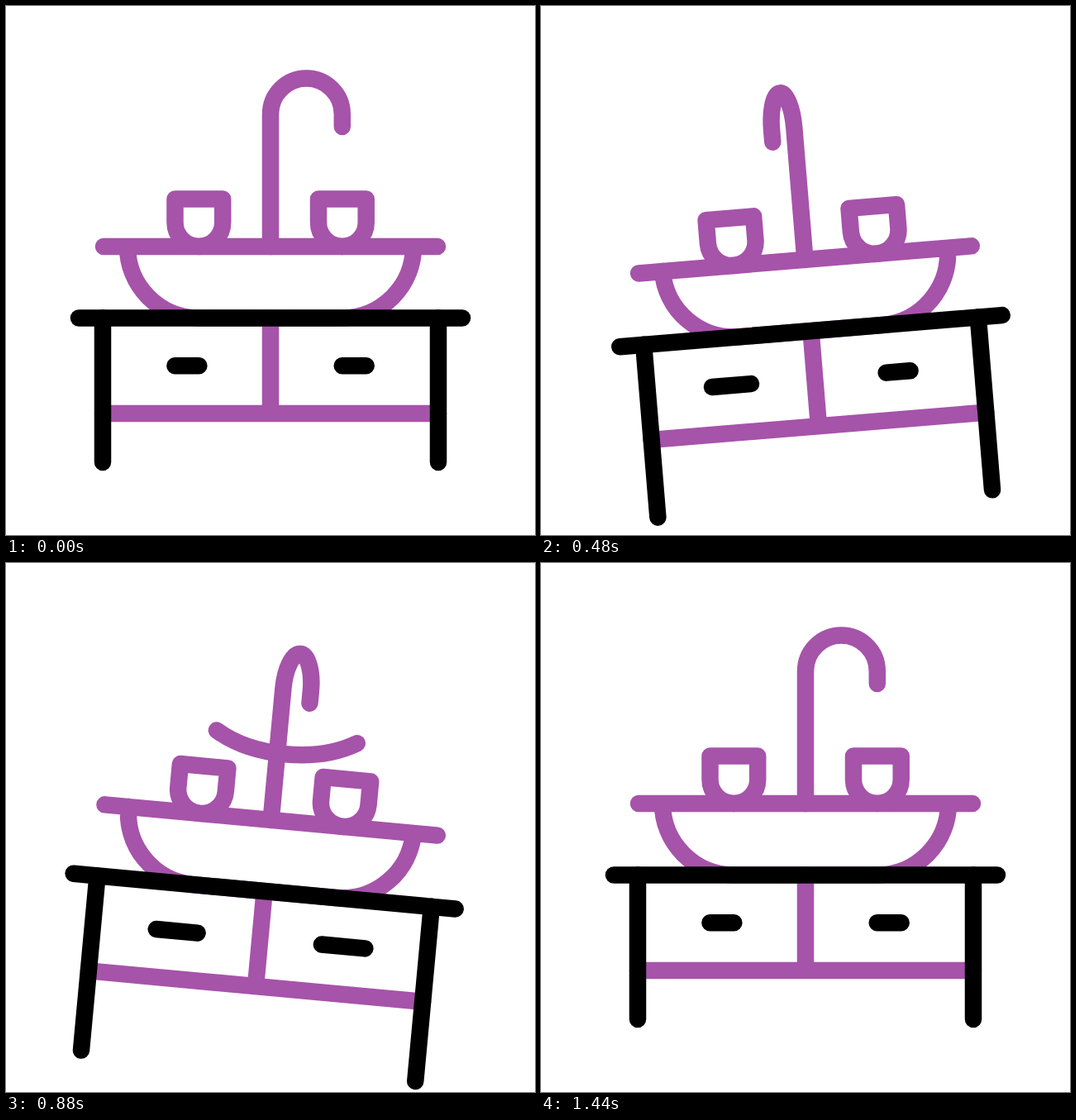
Recreate the animation shown at these times as an HTML page. Size 640 by 640 pixels, loop 1520 ms.

```html
<!DOCTYPE html>
<html lang="en">
<head>
<meta charset="utf-8">
<title>Washbasin</title>
<style>
  html, body { margin: 0; width: 100%; height: 100%; overflow: hidden; background: #fff; }
  svg { display: block; width: 100vw; height: 100vh; }
  path { fill: none; stroke-width: 20.5; stroke-linecap: round; stroke-linejoin: round; }
  .plum { stroke: #a653aa; }
  .ink { stroke: #000; }
</style>
</head>
<body>
<svg viewBox="0 0 640 640">
  <g id="unit">
    <g class="plum">
      <path d="M117 493H523M320 377.5V493"/>
      <path d="M118 291H522M147 291a86.5 86.5 0 0 0 86.5 86.5H406.5a86.5 86.5 0 0 0 86.5 -86.5"/>
      <path d="M204.5 233.5h57.7v28.6a28.85 28.85 0 0 1 -57.7 0z"/>
      <path d="M378 233.5h57.7v28.6a28.85 28.85 0 0 1 -57.7 0z"/>
      <path id="tap"/>
      <path id="arc" pathLength="1" d="M217 164.5C260.6 225.2 399 225.2 442.6 164.5"/>
    </g>
    <g class="ink">
      <path d="M88 377.5H552"/>
      <path id="legs"/>
      <path id="pulls"/>
    </g>
  </g>
</svg>
<script>
const LOOP = 1520, STEP = 40;
const $ = id => document.getElementById(id);

// Each track lists [time, value] keys.
const tracks = {
  turn:  [[80, 0], [400, -5], [1000, 6], [1440, 0]],
  drop:  [[80, 0], [720, 21.7], [1440, 0]],
  leg:   [[120, 0], [620, 40.6], [755, 40.6], [1345, 0]],
  hook:  [[95, 86.8], [630, -45.5], [1085, 86.8]],
  left:  [[208, 0], [690, 14.5], [722, 14.5], [1140, 0]],
  right: [[518, 0], [989, 13], [1402, 0]],
  head:  [[610, 0], [990, 1]],
  tail:  [[770, 0], [1150, 1]]
};

// cubic-bezier(.5, 0, .5, 1)
function ease(x) {
  let s = x;
  for (let i = 0; i < 6; i++) {
    s -= (1.5 * s * (1 - s) + s ** 3 - x) / (1.5 - 3 * s + 3 * s * s);
  }
  return s * s * (3 - 2 * s);
}

function sample(keys, t) {
  if (t <= keys[0][0]) return keys[0][1];
  for (let i = 1; i < keys.length; i++) {
    const [t0, a] = keys[i - 1], [t1, b] = keys[i];
    if (t < t1) return a + (b - a) * ease((t - t0) / (t1 - t0));
  }
  return keys[keys.length - 1][1];
}

function tapPath(w) {
  const mid = 320 + w / 2, end = 320 + w, k = w / 2 * 0.5523;
  return `M320 291V131C320 107 ${mid - k} 87.6 ${mid} 87.6` +
         `C${mid + k} 87.6 ${end} 107 ${end} 131V146`;
}

const pull = (x, grow) => `M${x - 14.5 - grow} 435.3H${x + 14.5 + grow}`;

function draw(t) {
  const v = {};
  for (const name in tracks) v[name] = sample(tracks[name], t);

  $('unit').setAttribute('transform', `translate(0 ${v.drop}) rotate(${v.turn} 320 298)`);
  $('tap').setAttribute('d', tapPath(v.hook));
  $('legs').setAttribute('d', `M117 377.5V${552 + v.leg}M523 377.5V${552 + v.leg}`);
  $('pulls').setAttribute('d', pull(218.9, v.left) + pull(421.2, v.right));

  const span = v.head - v.tail, arc = $('arc').style;
  arc.visibility = span > 0.001 ? 'visible' : 'hidden';
  arc.strokeDasharray = `${span} 3`;
  arc.strokeDashoffset = -v.tail;
}

const start = performance.now();
function tick() {
  const t = (performance.now() - start) % LOOP;
  draw(Math.floor(t / STEP) * STEP);
  requestAnimationFrame(tick);
}
tick();
</script>
</body>
</html>
```
